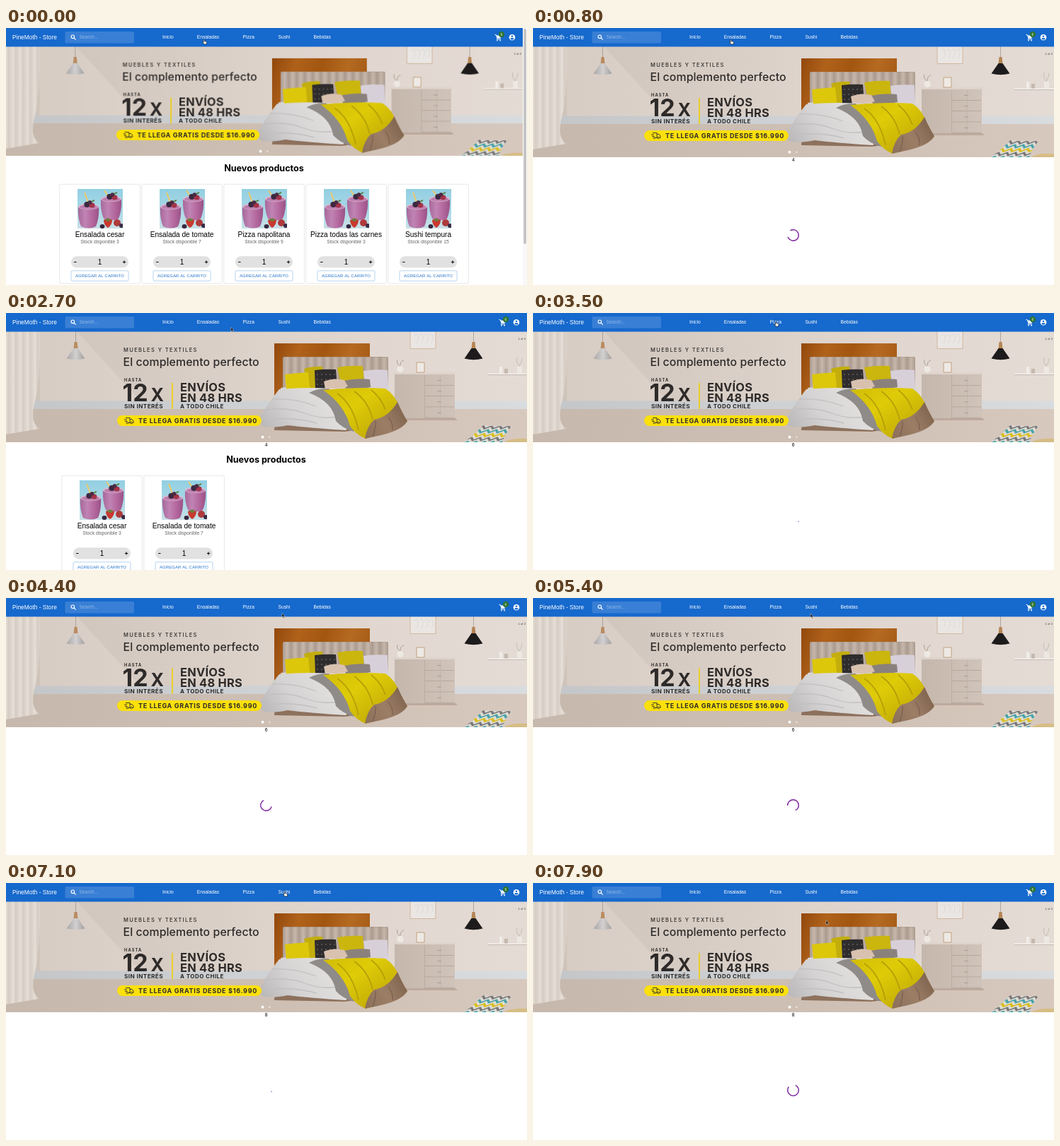
An HTML page with a canvas for the animation above (8 s loop, 736x364 px).

```html
<!DOCTYPE html>
<html lang="es">
<head>
<meta charset="utf-8">
<title>Tienda</title>
<style>
html, body { margin: 0; width: 100%; height: 100%; overflow: hidden; background: #fff; }
canvas { display: block; width: 736px; height: 364px; }
</style>
</head>
<body>
<canvas id="stage"></canvas>
<script>
const W = 736, H = 364, LOOP = 8000, TAU = Math.PI * 2;
const canvas = document.getElementById('stage');
const dpr = window.devicePixelRatio || 1;
canvas.width = W * dpr;
canvas.height = H * dpr;
let c = canvas.getContext('2d');

const UI = '"Liberation Sans", Arial, sans-serif';
const AD = 'Inter, sans-serif';
const INK = '#2d2a29', YELLOW = '#dcc70a';

function rect(x, y, w, h, fill) {
  c.fillStyle = fill;
  c.fillRect(x, y, w, h);
}
function round(x, y, w, h, r, fill, stroke, width = 0.6) {
  c.beginPath();
  c.roundRect(x, y, w, h, r);
  if (fill) { c.fillStyle = fill; c.fill(); }
  if (stroke) { c.strokeStyle = stroke; c.lineWidth = width; c.stroke(); }
}
function oval(x, y, rx, ry, fill) {
  c.beginPath();
  c.ellipse(x, y, rx, ry, 0, 0, TAU);
  c.fillStyle = fill;
  c.fill();
}
function shape(path, fill, stroke, width = 1) {
  const p = new Path2D(path);
  if (fill) { c.fillStyle = fill; c.fill(p); }
  if (stroke) { c.strokeStyle = stroke; c.lineWidth = width; c.stroke(p); }
}
function text(str, x, y, size, { color = '#000', weight = 400, family = UI, align = 'left', space = 0 } = {}) {
  c.font = `${weight} ${size}px ${family}`;
  c.letterSpacing = space + 'px';
  c.textAlign = align;
  c.fillStyle = color;
  c.fillText(str, x, y);
}
function gradient(x0, y0, x1, y1, ...stops) {
  const g = c.createLinearGradient(x0, y0, x1, y1);
  stops.forEach((s, i) => g.addColorStop(i / (stops.length - 1), s));
  return g;
}
function at(x, y, draw, scale = 1) {
  c.save();
  c.translate(x, y);
  c.scale(scale, scale);
  draw();
  c.restore();
}

// ---- banner ----
function lamp(x, tip, fill) {
  rect(x - 0.3, 26, 0.6, 16, '#8a837d');
  shape(`M${x - 2} 41h4l1 10h-6z`, tip);
  shape(`M${x - 3} 50h6l10 14.5q-13 3.5-26 0z`, fill);
}
function room() {
  rect(0, 26, W, 157, gradient(0, 0, W, 0, '#cdc2b8', '#d5cac1', '#ddd3cb', '#e2d8d1', '#e4dbd4'));
  shape('M48 26H100L190 125H48z', 'rgba(255,248,242,.16)');
  rect(0, 124.5, W, 12, gradient(0, 0, W, 0, '#c3c5c7', '#cfd2d5', '#d9dcdf'));
  rect(0, 136, W, 47, gradient(0, 0, W, 0, '#c6b8ac', '#cbbdb1', '#d0c1b6', '#d8c9bf'));

  const folds = Array.from({ length: 15 }, (_, i) => ['#e6dfd8', '#d6ccc3', '#ddd4cc'][i % 3]);
  shape('M0 26H48Q49 95 41 125T47 164L0 172z', gradient(0, 0, 48, 0, ...folds));
  lamp(98.5, '#b98c60', gradient(86, 0, 112, 0, '#a9a7a8', '#d2d0d0', '#9e9b9b'));
  lamp(660.5, '#b58553', '#1d1b1c');

  round(571, 20, 36, 30.5, 0, '#eae6e3', '#cfb39a', 0.9);
  for (let i = 0; i < 4; i++) shape(`M${577 + i * 7} 33q4-7 5 0t-3 10`, null, '#cdd2d6', 0.6);

  rect(680, 85.5, 56, 1.6, '#f4f1ee');
  rect(680, 87, 56, 1, '#c3b8b0');
  rect(697, 76, 4, 9.5, '#f0ece8');
  rect(704, 79, 5, 6.5, '#c5b8ad');
  shape('M722 85v-9h7v9z', '#eee8e2');
  shape('M725 75q-5-5-3-12m3 12q4-6 4-11', null, '#b3aaa0', 0.6);
}
function dresser() {
  shape('M546 148h88l4 4h-96z', '#bcaa9d');
  rect(549, 86, 85, 63, gradient(549, 0, 634, 0, '#c5b7ac', '#d0c3b9'));
  rect(547, 84.5, 88, 2.5, '#ddd3cb');
  rect(591, 88, 0.8, 61, '#b7a99e');
  for (let i = 0; i < 4; i++) {
    rect(592, 102 + i * 15.3, 41, 0.7, '#ac9e93');
    rect(609, 95 + i * 15.3, 6, 0.8, '#a0928a');
  }
  rect(613, 88, 0.6, 61, '#bbada2');
  oval(557, 79.5, 4.5, 4.8, '#eee8e3');
  shape('M556 75q-5-5-3-9m4 9q0-7 5-8', null, '#a09380', 0.8);
  round(580, 70, 11, 14, 0, '#eee9e4', '#bd9a78', 0.9);
}
function bed() {
  rect(379, 43, 135, 75, gradient(379, 43, 514, 85, '#92480c', '#b0621b', '#a2560f', '#b56a22', '#a45a15'));
  round(391, 62, 149, 70, 2, '#a89689');
  for (let i = 0; i < 13; i++) {
    const x = 391.4 + i * 11.45;
    round(x, 62.4, 11, 69, 2, gradient(x, 0, x + 11, 0, '#ad9c90', '#c6b7ac', '#ad9c90'));
  }
  shape('M380 154L379 166L478 168L560 158V140z', '#8d715d');
  shape('M388 106Q460 98 540 103L550 128L470 142L392 130z', '#d9d6d5');

  // pillows
  shape('M505 82q16-3 34-1l1 25q-18 3-33 1z', '#d8d0d9');
  shape('M421 79q14-4 26-3l5 28-24 3z', '#c3ae0c');
  shape('M468 77q18-3 36-2l2 24-32 5z', '#cbb60e');
  shape('M394 87q17-2 33-3l2 22q-17 3-33 2z', YELLOW);
  shape('M436 81q15-2 30-1l2 26q-16 2-31 2z', '#2f2c2e');
  for (let i = 0; i < 15; i++) oval(440 + (i % 5) * 6, 87 + Math.floor(i / 5) * 7, 0.7, 0.7, '#99928e');
  shape('M477 96q18-4 37-2l1 11q-17 4-35 3z', '#8a817d');
  shape('M449 97q14-6 29-2l5 9q-16 5-32 4z', '#d9c1b0');

  // duvet and throws
  shape('M386 108Q430 104 478 108L496 148L480 166Q430 163 398 159Q378 163 366 161Q355 158 360 146Q366 136 375 122z',
    gradient(360, 160, 440, 106, '#b9b7b8', '#d5d3d3', '#e0dedd'));
  shape('M364 138q32-6 58 4t50 4M376 122q30-2 62 10M369 152q34-6 70 4', null, '#c2c0c0', 1.3);
  shape('M428 113Q440 106 456 107L480 130L492 168Q476 164 466 153Q462 126 428 113z', '#8f8b89');
  shape('M448 109Q500 104 536 107Q550 116 556 134L567 154Q552 166 530 172L508 178Q494 172 486 160Q478 130 448 109z',
    gradient(450, 108, 500, 178, '#d2bd06', '#e0cb08', '#c8b206'));
  shape('M468 114q22 15 30 52M492 111q20 14 26 40M516 109q14 11 20 28', null, '#b5a007', 1.8);
  shape('M553 126Q560 142 567 153Q560 166 530 173L507 178Q510 160 520 151Q540 148 553 126z',
    gradient(508, 175, 566, 140, '#8c705a', '#9c7e66', '#7f634e'));
  shape('M522 153q1 9-4 22M540 147q7 8 6 19', null, '#75594a', 1);
}
function cushion() {
  shape('M704 183q8-6 32-5v5z', '#d6bd85');
  c.save();
  const body = new Path2D('M674 159Q692 161 714 160Q706 170 701 183H647Q662 172 674 159z');
  c.clip(body);
  c.fillStyle = '#dedbd2';
  c.fill(body);
  c.translate(674, 160);
  c.transform(1, 0, -1, 1, 0, 0);
  ['#77777a', '#46a2a8', '#d9bd1c', '#77777a', '#46a2a8'].forEach((color, row) => {
    c.beginPath();
    for (let i = 0; i < 14; i++) c.lineTo(-12 + i * 6, row * 5.5 + (i % 2) * 4);
    c.strokeStyle = color;
    c.lineWidth = 2.2;
    c.stroke();
  });
  c.restore();
}
function offer() {
  const ink = (weight, space = 0) => ({ color: INK, weight, family: AD, space });
  text('MUEBLES Y TEXTILES', 166, 55, 7.5, ink(500, 1.4));
  text('El complemento perfecto', 165.5, 75, 15.8, ink(500, 0.12));
  text('HASTA', 167, 96.5, 5.6, ink(700, 1.2));
  text('12', 164.5, 125, 34, ink(700));
  text('X', 204.5, 125, 25, ink(700));
  text('SIN INTERÉS', 167, 135, 8.2, ink(700, 0.4));
  rect(234, 99, 1.8, 37, '#eccf1b');
  text('ENVÍOS', 246, 110.8, 16.4, ink(700, 0.25));
  text('EN 48 HRS', 246, 125.8, 16.4, ink(700, 0.25));
  text('A TODO CHILE', 246, 135, 8, ink(700, 0.45));
  round(157, 145, 204, 15, 7.5, '#fbe00c');
  text('TE LLEGA GRATIS DESDE $16.990', 187, 156, 9, ink(700, 0.7));
  shape('M169 148.5h6v7h-5M175 150.5h3l2 2.5v2.5h-5M167 151h4M168 153.3h3', null, INK, 0.9);
  round(170, 154.2, 2.6, 2.6, 1.3, '#fbe00c', INK, 0.8);
  round(175.8, 154.2, 2.6, 2.6, 1.3, '#fbe00c', INK, 0.8);
}
function banner() {
  room();
  dresser();
  bed();
  cushion();
  offer();
  oval(362.5, 175.8, 2, 2, '#fff');
  oval(372.3, 175.8, 1.4, 1.4, 'rgba(255,255,255,.5)');
  text('1 of 2', 734, 37.6, 4.2, { color: '#444', align: 'right' });
}

// ---- app bar ----
function appBar(width) {
  rect(0, 0, width, 26.5, '#1669cd');
  const white = { color: '#fff' };
  text('PineMoth - Store', 9, 16, 8.4, white);
  round(83.5, 5, 97.5, 16.5, 1.7, 'rgba(255,255,255,.15)');
  c.beginPath();
  c.arc(94.3, 12.3, 2.3, 0, TAU);
  c.moveTo(96, 14);
  c.lineTo(98.7, 16.7);
  c.strokeStyle = '#fff';
  c.lineWidth = 1.1;
  c.stroke();
  text('Search...', 103.5, 15.4, 6.72, { color: 'rgba(255,255,255,.45)' });
  [['Inicio', 221], ['Ensaladas', 269.7], ['Pizza', 334.5], ['Sushi', 384.5], ['Bebidas', 434.5]]
    .forEach(([label, x]) => text(label, x, 15.4, 6.72, white));

  at(width - 35, 13.5, () => {
    shape('M-4.5-4h1.6l2 4.7h4.2l2-3.7', null, '#fff', 1);
    shape('M-2.6-3h7l-2 3.5h-3.4z', '#fff');
    shape('M-.8.6l-1 1.8h5.8', null, '#fff', 0.9);
    oval(-1, 4, 0.9, 0.9, '#fff');
    oval(3.2, 4, 0.9, 0.9, '#fff');
    oval(5, -4.5, 4.2, 4.2, '#2c7434');
    text('6', 5, -2.7, 5, { color: '#dfeee0', align: 'center' });
  });
  at(width - 15, 13.3, () => {
    oval(0, 0, 4.3, 4.3, '#fff');
    oval(0, -1.5, 1.3, 1.3, '#1669cd');
    oval(0, 2, 2.6, 1.2, '#1669cd');
  });
}

// ---- products ----
const PRODUCTS = [
  ['Ensalada cesar', 3], ['Ensalada de tomate', 7], ['Pizza napolitana', 9],
  ['Pizza todas las carnes', 3], ['Sushi tempura', 15]
];
function smoothie(x, y) {
  shape(`M${x - 14.5} ${y}h29q1 16-4 28q-10 5-21 0q-5-12-4-28z`,
    gradient(x - 14, 0, x + 14, 0, '#a86a9c', '#c084b4', '#b5699f', '#9c5488'));
  oval(x, y, 14.5, 4.2, '#dcb9d2');
  oval(x, y + 0.4, 12.6, 3.2, '#bd7dac');
  oval(x - 2, y - 3, 4.2, 4, '#3b2840');
  oval(x + 5, y - 2, 4, 3.6, '#a33348');
  oval(x + 2, y - 6, 3, 2.8, '#4b2b42');
  shape(`M${x + 4} ${y - 7}q3-4 5-2q-2 3-5 2z`, '#57823b');
}
function strawberry(x, y) {
  shape(`M${x - 6} ${y - 4}q6-4 12 0q0 7-6 11q-6-4-6-11z`, '#c9392f');
  shape(`M${x - 5} ${y - 4}l5-3 5 3-5 2z`, '#6b7f3f');
}
function photo() {
  c.save();
  c.beginPath();
  c.rect(0, 0, 64, 56);
  c.clip();
  rect(0, 0, 64, 56, gradient(0, 0, 0, 56, '#93cfe2', '#a6d8e6', '#c9e0e6'));
  shape('M10 5L17 24', null, '#ecc96b', 2);
  shape('M38 2L45 13', null, '#ecc96b', 2);
  smoothie(47.5, 14);
  smoothie(15.5, 25);
  strawberry(43, 48);
  oval(56, 48, 5, 5, '#b03a3c');
  oval(35, 53, 3.4, 3, '#35263f');
  oval(62, 52, 3, 3, '#3a2b45');
  c.restore();
}
function card([name, stock]) {
  const mid = { align: 'center' };
  const sign = { align: 'center', weight: 600, family: AD };
  round(0.3, 0.3, 113.6, 140.4, 1.7, '#fff', '#dedede', 0.7);
  at(25.5, 7, photo);
  text(name, 57, 74.6, 10.08, mid);
  text(`Stock disponible ${stock}`, 57, 84.3, 6.72, { color: '#666', align: 'center' });
  round(16.5, 102.3, 81, 16.2, 8, '#e1e1e1');
  text('-', 22.3, 113.6, 10, sign);
  text('1', 57, 114, 10, mid);
  text('+', 91.5, 113.4, 9, sign);
  round(16.5, 122.8, 81, 14.4, 1.7, '#fff', 'rgba(25,118,210,.55)');
  text('AGREGAR AL CARRITO', 57, 132.2, 5.88, { color: '#1b6ec8', align: 'center', space: 0.168 });
}
function products(list, x, y) {
  text('Nuevos productos', x + 289, y - 18.3, 12.6, { weight: 700, family: AD, align: 'center' });
  list.forEach((item, i) => at(x + i * 116, y, () => card(item)));
}

function spinner(elapsed) {
  const p = (elapsed % 1400) / 1400, R = 20.2, around = TAU * R;
  const ease = v => v * v * (3 - 2 * v);
  const grow = ease(Math.min(1, p * 2)), slip = ease(Math.max(0, p * 2 - 1));
  const start = 15 * grow + 110 * slip;
  const end = Math.min(around, start + 1 + 99 * grow);
  at(367.5, 293.5, () => {
    c.rotate(p * TAU);
    c.beginPath();
    c.arc(0, 0, R, start / R, end / R);
    c.strokeStyle = '#7b1f9b';
    c.lineWidth = 3.6;
    c.stroke();
  }, 17 / 44);
}

// ---- pointer ----
const MOVES = [
  [0, 279, 16], [1400, 279, 16], [2600, 317.8, 20.3], [2700, 317.8, 20.3], [3300, 342.5, 12],
  [3700, 342.5, 12], [4500, 392, 22], [5700, 392, 22], [6200, 393.6, 18], [6600, 393.6, 18],
  [6900, 393, 12], [7400, 393, 12], [7850, 414, 53], [LOOP, 414, 53]
];
const HOVERS = [[0, 1600], [3100, 3900], [6700, 7500]];
function pointer(t) {
  const i = MOVES.findIndex(m => m[0] > t);
  const [t0, x0, y0] = MOVES[i - 1], [t1, x1, y1] = MOVES[i];
  const v = (t - t0) / (t1 - t0), k = v * v * (3 - 2 * v);
  const hand = HOVERS.some(([a, b]) => t >= a && t < b);
  at(x0 + (x1 - x0) * k, y0 + (y1 - y0) * k, () => {
    if (hand) shape('M0 .6q.7-1 1.3 0v2l2.7.7q.8.3.6 1.4l-.6 2.3h-3l-2.3-2.6q.1-.9 1.3-.1z', '#fff', '#111', 0.7);
    else shape('M0 0v5.8l1.4-1.2 1 2.2 1-.5-1-2.1h1.8z', '#111', '#fff', 0.4);
  });
}

// ---- timeline ----
const VISITS = [
  { from: 100, count: 4, list: PRODUCTS.slice(0, 2) },
  { from: 3500, count: 6, list: PRODUCTS.slice(2, 4) },
  { from: 7100, count: 8, list: PRODUCTS.slice(4) }
];
const LOADING = 2000, LEAD = 44;
const BANNER_TOP = 26, BANNER_HEIGHT = 156.5;

const art = document.createElement('canvas');
art.width = W * dpr;
art.height = 183 * dpr;
const main = c;
c = art.getContext('2d');
c.scale(dpr, dpr);
banner();
c = main;

function draw(t) {
  c.setTransform(dpr, 0, 0, dpr, 0, 0);
  rect(0, 0, W, H, '#fff');
  const visit = VISITS.filter(v => t >= v.from).pop();
  const width = visit ? W : 730, k = width / W;
  c.drawImage(art, 0, BANNER_TOP * dpr, W * dpr, BANNER_HEIGHT * dpr, 0, BANNER_TOP, width, BANNER_HEIGHT * k);
  appBar(width);
  if (!visit) {
    products(PRODUCTS, 75.5, 221);
    rect(730, 0, 6, H, '#f8f8f8');
    round(731.3, 1, 3.6, 305, 1.8, '#c1c1c1');
  } else {
    text(visit.count, 367.5, 188.8, 6.72, { align: 'center' });
    const elapsed = t - visit.from;
    if (elapsed < LOADING) spinner(elapsed + LEAD);
    else products(visit.list, 78.5, 230);
  }
  pointer(t);
}
function tick() {
  draw(performance.now() % LOOP);
  requestAnimationFrame(tick);
}
tick();
</script>
</body>
</html>
```
